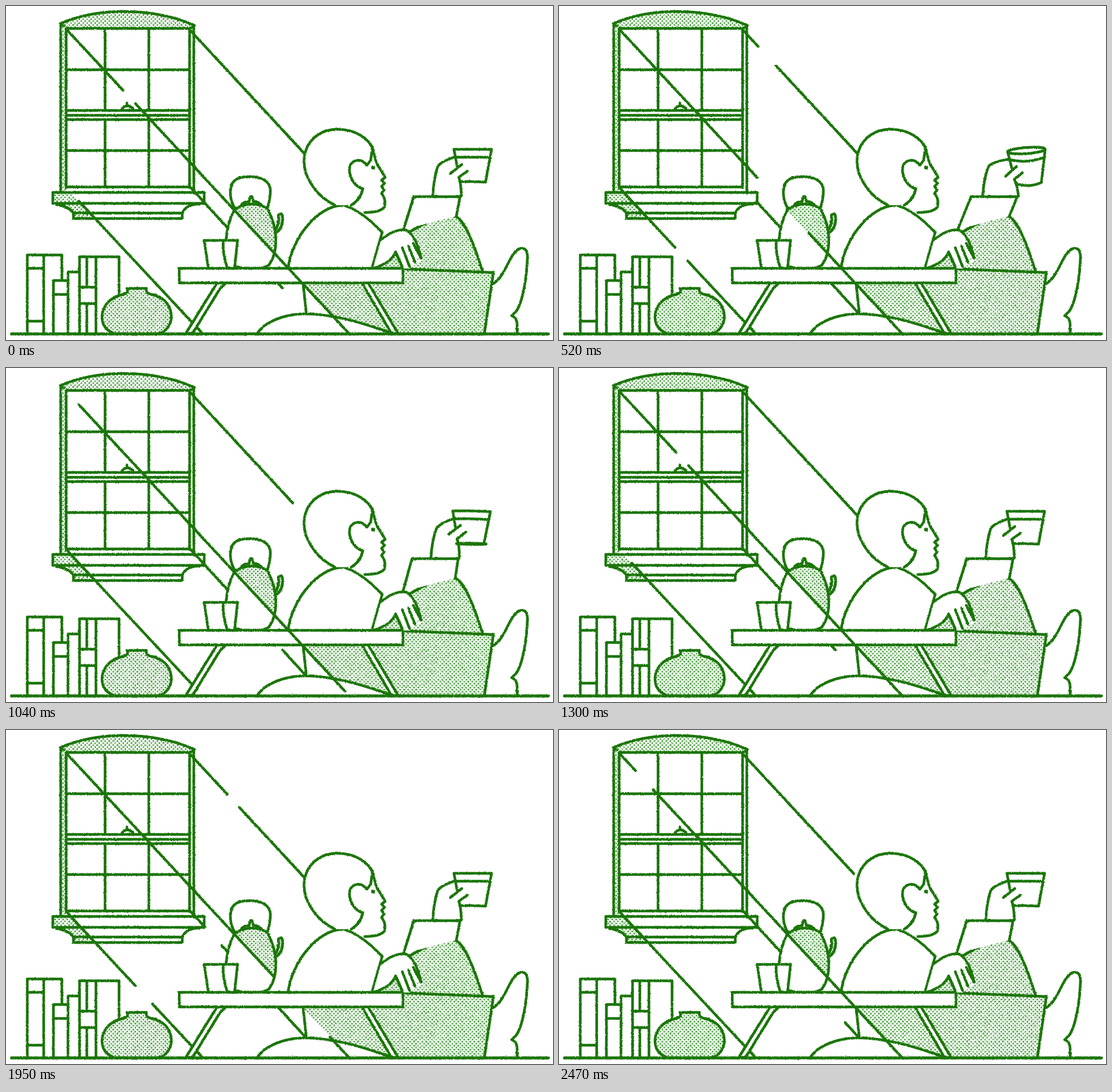
Write an HTML page that moves like this. It is 900 px wide and 550 px high and loops after 2600 ms.

```html
<!DOCTYPE html>
<html lang="en">
<head>
<meta charset="utf-8">
<title>Tea in the window light</title>
<style>
  html, body { margin: 0; width: 100%; height: 100%; overflow: hidden; background: #fff; }
  svg { display: block; width: 900px; height: 550px; }
  .ink { fill: none; stroke: #1b7508; stroke-width: 4.4; stroke-linecap: round; stroke-linejoin: round; }
  .white { fill: #fff; }
  .tone { fill: url(#dots); stroke: none; }
  .shaded { fill: url(#dots); }
</style>
</head>
<body>
<svg viewBox="0 0 900 550">
  <defs>
    <pattern id="dots" width="6.6" height="6.6" patternUnits="userSpaceOnUse">
      <rect width="6.6" height="6.6" fill="#fff"/>
      <g fill="#36962a">
        <circle cx="1.65" cy="1.65" r="1.45"/>
        <circle cx="4.95" cy="4.95" r="1.45"/>
      </g>
    </pattern>
    <filter id="rough" x="0" y="0" width="900" height="550" filterUnits="userSpaceOnUse" color-interpolation-filters="sRGB">
      <feTurbulence type="fractalNoise" baseFrequency=".45" numOctaves="2" seed="4"/>
      <feDisplacementMap in="SourceGraphic" scale="2.6" xChannelSelector="R" yChannelSelector="G"/>
    </filter>
  </defs>
  <rect width="900" height="550" fill="#fff"/>
  <g class="ink" filter="url(#rough)">
    <!-- window -->
    <path class="shaded" d="M89 29Q135 9 195 9Q262 10 310 32L303 37H99Z"/>
    <path class="tone" d="M91 34H99V307H91ZM77 307H107L148 350H111Q105 331 85 327L77 325Z"/>
    <path d="M90 30V307M99 37V299M302 37V299M309 32V308M163 37V172M235 37V172M163 187V298M235 187V298
      M99 105H302M99 172H302M99 180H302M99 187H302M99 238H302M99 298H302"/>
    <path d="M77 307H326V325H77ZM83 327Q104 330 111 341V350H290V341Q297 326 318 326M111 341H290"/>
    <path d="M191 169Q199 160 209 169M199 160V161"/>

    <!-- books and vase -->
    <path d="M92 449V410H35V540M62 410V540M35 432H62M35 519H62M78 540V452H102M78 475H102M102 540V438H120
      M121 540V413H186V477M133 413V463M133 490V540M148 413V540M121 463H148M121 490H148"/>
    <path class="shaded" d="M199 465H231Q229 473 240 475C262 480 272 495 272 511C272 527 262 537 250 540H180
      C165 535 158 525 158 512C158 495 170 480 192 475Q203 473 199 465Z"/>

    <path id="rayA"/><path id="rayC"/><path id="rayD"/>

    <!-- legs and cushion -->
    <path class="tone" d="M489 458L537 510Q590 520 637 540H787L802 439L655 433L653 458Z"/>
    <path class="shaded" d="M664 372C690 357 712 345 735 345C752 346 768 385 784 437"/>
    <path class="tone" d="M664 372L784 437L655 433L612 432Q635 425 641 404Z"/>
    <path d="M657 433L802 439L787 540M489 458L494 506M413 540C425 520 460 506 495 507C540 508 590 522 637 540"/>
    <path d="M802 457C822 445 828 408 844 400Q857 395 858 412C857 445 851 485 840 502L832 510Q841 513 841 525V539"/>

    <!-- raised arm and cup -->
    <path id="sleeve" class="white"/>
    <path id="hand"/>
    <g id="cup"><path id="glass"/><path id="fingers"/></g>

    <!-- torso and head -->
    <path class="white" d="M464 432C470 385 510 329 555 328C580 335 605 358 619 373L602 432"/>
    <path class="white" stroke="none" d="M541 328C505 310 487 275 491 247C496 218 520 203 545 203C575 203 597 220 604 236L624 282L622 332L590 340L568 328Z"/>
    <path d="M541 328C505 310 487 275 491 247C496 218 520 203 545 203C575 203 597 218 604 236Q607 254 612 263L624 282L618 287L623 292L618 297L622 303L618 309Q625 316 623 330Q618 340 590 340"/>
    <path d="M603 232L600 254L594 262C582 248 565 254 565 270C566 285 575 298 587 301Q584 318 568 328"/>
    <circle cx="604" cy="266" r="1.8" fill="#1b7508" stroke-width="3"/>

    <!-- resting hand -->
    <path class="white" d="M617 385Q640 366 658 369Q674 376 683 415L672 424L663 430L652 430L641 405Q634 423 604 432"/>
    <path stroke="#fff" stroke-width="4.6" d="M683 417L672 423M671 425L663 430M661 430L653 430"/>
    <path d="M641 405L652 430M652 398L664 429M662 395L673 422M670 391L683 415"/>

    <!-- teapot and glass -->
    <path d="M377 334C368 320 368 305 371 295C376 282 390 281 402 281C420 281 434 288 435 303Q435 318 430 333"/>
    <path class="shaded" d="M441 371Q451 360 448 344Q456 338 455 352Q455 368 443 374"/>
    <path class="white" stroke="none" d="M376 334Q403 318 430 333Q444 360 444 385Q444 410 432 427Q420 432 385 432L362 410V385Q364 360 376 334Z"/>
    <path class="tone" d="M376 337Q403 318 430 333Q444 360 444 385L441 407Z"/>
    <path d="M362 386Q364 358 376 335Q403 318 430 333Q444 360 444 385Q444 412 432 427Q424 433 400 432Q384 432 377 428
      M387 327Q394 321 400 322L402 314H405L407 322Q414 321 420 327"/>
    <path class="white" d="M333 432L326 386H381L376 432"/>
    <path d="M357 387Q357 410 364 431"/>

    <!-- table -->
    <path class="white" d="M346 458L296 539H307L353 464L360 458M587 458L634 539H645L597 458"/>
    <path class="white" d="M285 432H653V456H285Z"/>
    <path id="rayB"/>
    <path d="M9 540H892" stroke-width="5"/>
  </g>
</svg>
<script>
  const LOOP = 2600, STEP = 130, CYCLE = 10;
  const el = id => document.getElementById(id);
  const setPath = (id, d) => el(id).setAttribute('d', d);

  // Each gap key: step, gap start x, gap end x.
  const rays = {
    rayA: { from: [303, 40], to: [491, 243],
      gaps: [[2, 290, 311], [4, 328, 357], [5, 364, 384], [6, 395, 415], [8, 472, 495], [9, 485, 510]] },
    rayB: { from: [100, 39], to: [565, 540],
      gaps: [[8, 95, 120], [9, 126, 155], [10, 193, 213], [12, 254, 291], [14, 326, 411], [15, 441, 533], [16, 512, 558], [18, 558, 580]] },
    rayC: { from: [100, 300], to: [322, 538],
      gaps: [[10, 95, 120], [12, 162, 181], [14, 191, 212], [15, 213, 241], [16, 253, 290], [18, 314, 330]] },
    rayD: { from: [303, 298], to: [493, 506],
      gaps: [[4, 295, 325], [5, 327, 355], [6, 348, 375], [8, 430, 455], [9, 443, 471], [10, 455, 495], [12, 487, 510]] }
  };

  // Step, sleeve shift, wrist shift, cup x, cup y, cup angle, rim tilt.
  const poses = [
    [0, 0, 0, 768, 236, 0, 0],
    [2, 9, 3, 782, 237, 5, .5],
    [4, 7, -5, 769, 238, -4, 1],
    [6, -6, -13, 748, 236, -14, -1],
    [8, -3, -3, 766, 236, 1, -.15],
    [10, 0, 0, 768, 236, 0, 0]
  ];

  // Linear interpolation along keys; null outside their range.
  function track(keys, step) {
    const last = keys.length - 1;
    if (step < keys[0][0] || step > keys[last][0]) return null;
    const i = Math.min(keys.findLastIndex(k => k[0] <= step), last - 1);
    const a = keys[i], b = keys[i + 1], u = (step - a[0]) / (b[0] - a[0]);
    return a.slice(1).map((v, j) => v + (b[j + 1] - v) * u);
  }

  function drawRay(id, step) {
    const { from: [x0, y0], to: [x1, y1], gaps } = rays[id];
    const at = x => `${x} ${y0 + (x - x0) * (y1 - y0) / (x1 - x0)}`;
    const open = [step, step + CYCLE].map(s => track(gaps, s)).filter(Boolean).sort((a, b) => a[0] - b[0]);
    let x = x0, d = '';
    for (const [start, end] of [...open, [x1, x1]]) {
      const stop = Math.min(start, x1);
      if (stop > x) d += `M${at(x)}L${at(stop)}`;
      x = Math.max(x, end);
    }
    setPath(id, d);
  }

  function drawArm(step) {
    const [sleeve, wrist, cx, cy, angle, tilt] = track(poses, Math.min(step, 10));
    const rad = angle * Math.PI / 180, c = Math.cos(rad), s = Math.sin(rad);
    const onCup = (x, y) => `${cx + x * c - y * s} ${cy + x * s + y * c}`;
    const bow = 9 * tilt, ry = 5 * Math.abs(tilt), lift = 10 * Math.min(tilt, 0);
    const rim = tilt > 0 ? `M-31 0A31 ${ry} 0 1 1 31 0A31 ${ry} 0 1 1 -31 0` : `M-31 0Q0 ${bow} 31 0`;
    const base = tilt < 0 ? `M-20 53A20 ${ry} 0 1 1 21 54A20 ${ry} 0 1 1 -20 53` : `M-21 53Q0 ${53 + bow} 21 54`;

    setPath('sleeve', `M${654 + sleeve * .3} 368L${671 + sleeve} 314H${747 + sleeve}L${741 + Math.min(sleeve, 0) * .6} 346`);
    setPath('hand', `M${702 + wrist} 313Q${704 + wrist} 284 ${710 + wrist * .7} 265Q${713 + wrist * .6} 257 ${onCup(-28, 12)}
      M${onCup(-23, 46)}Q${onCup(-19, 56)} ${749 + sleeve} 313`);
    el('cup').setAttribute('transform', `translate(${cx} ${cy}) rotate(${angle})`);
    setPath('glass', `${rim}M-31 0L-26 27M-29 13Q0 ${13 + bow} 29 13M31 0L21 54${base}`);
    setPath('fingers', `M-37 ${40 + lift}L-18 ${25 + lift}M-23 46L-9 ${36 + lift}`);
  }

  let shown = -1;
  function render(time) {
    const step = Math.floor(time % LOOP / STEP);
    if (step !== shown) {
      shown = step;
      Object.keys(rays).forEach(id => drawRay(id, step % CYCLE));
      drawArm(step);
    }
  }

  const begin = performance.now();
  function tick() {
    render(performance.now() - begin);
    requestAnimationFrame(tick);
  }
  tick();
</script>
</body>
</html>
```
